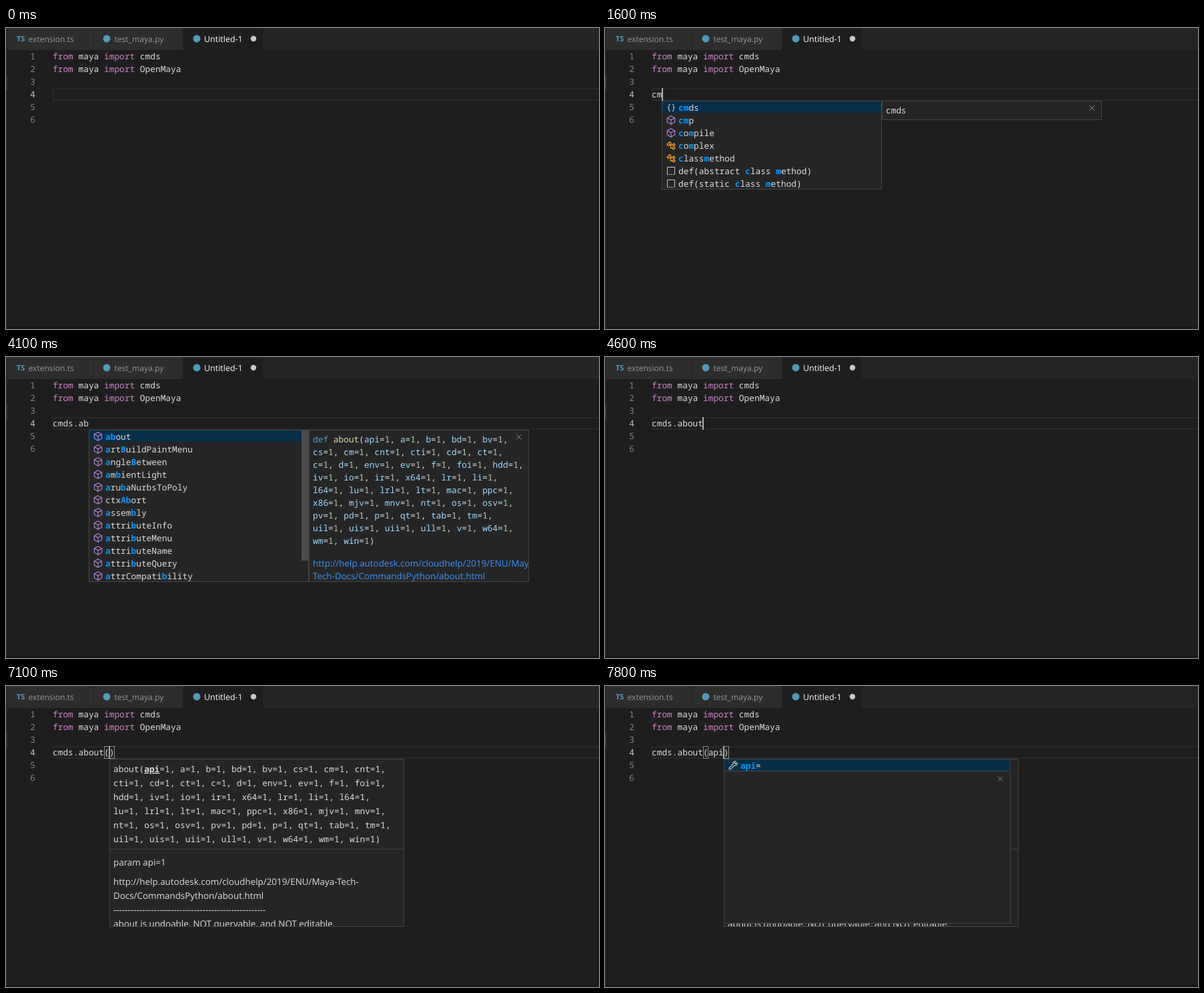
These frames come from a looping animation (889 by 451 pixels, 8 s). An HTML page:

```html
<!DOCTYPE html>
<html lang="en">
<head>
<meta charset="utf-8">
<title>Code completion</title>
<style>
html, body { margin: 0; width: 100%; height: 100%; overflow: hidden; background: #1e1e1e; }
svg { display: block; width: 100%; height: 100%; }
text { white-space: pre; text-rendering: geometricPrecision; }
.mono { font: 12.83px "Noto Sans Mono", "DejaVu Sans Mono", monospace; }
.ui { font: 13.4px "Open Sans", "Noto Sans", sans-serif; }
.tab { font: 12.1px "Open Sans", "Noto Sans", sans-serif; }
</style>
</head>
<body>
<svg id="stage" viewBox="0 0 889 451" xmlns="http://www.w3.org/2000/svg"></svg>
<script>
const LOOP = 8000, CHAR = 7.698, TEXT_X = 70, TOP = 109, ROW = 19;
const FG = '#dedede', PINK = '#d183cc', MATCH = '#0097fb', PANEL = '#252526', EDGE = '#454545', PICK = '#062f4a';

const rect = (x, y, w, h, fill, more = '') =>
  `<rect x="${x}" y="${y}" width="${w}" height="${h}" fill="${fill}" ${more}/>`;
const frame = (x, y, w, h, fill, stroke) =>
  rect(x + .5, y + .5, w - 1, h - 1, fill, `stroke="${stroke}"`);
const path = (d, stroke, more = '') => `<path d="${d}" fill="none" stroke="${stroke}" ${more}/>`;
const text = (x, y, body, cls = 'mono', fill = FG, more = '') =>
  `<text x="${x}" y="${y}" class="${cls}" fill="${fill}" ${more}>${body}</text>`;
const span = (body, fill, more = '') => `<tspan fill="${fill}" ${more}>${body}</tspan>`;
const close = (x, y) => path(`M${x - 3.5} ${y - 3.5}l7 7m0 -7l-7 7`, '#8c8c8c');

const flags = ('api a b bd bv cs cm cnt cti cd ct c d env ev f foi hdd iv io ir x64 lr li l64 lu lrl lt ' +
  'mac ppc x86 mjv mnv nt os osv pv pd p qt tab tm uil uis uii ull v w64 wm win').split(' ');
const signature = `about(${flags.map(f => f + '=1').join(', ')})`;
const site = 'http://help.autodesk.com/cloudhelp/2019/ENU/';

function wrap(str, limit) {
  const lines = [''];
  for (const word of str.split(' ')) {
    const last = lines[lines.length - 1];
    if (last && last.length + 1 + word.length > limit) lines.push(word);
    else lines[lines.length - 1] = last ? last + ' ' + word : word;
  }
  return lines;
}

const paint = line => line
  .replace(/(\w+)=1/g, (_, name) => span(name, '#9cdcfe') + '=' + span('1', '#b5cea8'))
  .replace(/^def about/, span('def', '#569cd6') + ' ' + span('about', '#dcdcaa'));

const docLines = wrap('def ' + signature, 41).map(paint);
const tipLines = wrap(signature, 55);
tipLines[0] = tipLines[0].replace('api', span('api', FG, 'font-weight="700" text-decoration="underline"'));

const icons = {
  n: text(-7, 4, '{', 'mono', '#c5c5c5') + text(0, 4, '}', 'mono', '#c5c5c5'),
  m: path('M0-6.2L5.6-3.2V3L0 6.2L-5.6 3V-3.2ZM-5.6-3.2L0-.2L5.6-3.2M0-.2V6', '#b180d7', 'stroke-width="1.2"'),
  c: path('M-6-1.5L-2-5.5L0-3.5L-4 .5ZM-2.5-1H2M-.5-1V4H2M2-1L4.2-3L6-1L4 1ZM2 4L4.2 2L6 4L4 6Z', '#ee9d28', 'stroke-width="1.3"'),
  s: path('M-5.5 5V-5.5H5.5V5', '#c5c5c5') + path('M-6 5.5H6', '#c5c5c5', 'stroke-dasharray="2 1"'),
  w: path('M-6 4L0-2C-1-5 2-7 4-6L2-3.5L3.5-2L6-4C7-1 4 1.5 2 0L-4 6Q-6 6-6 4Z', '#c5c5c5', 'stroke-width="1.1"')
};

// Each entry is an icon key plus a label; * marks a matched letter.
const entries = str => str.split('|').map(e => [e[0], e.slice(1)]);
const lists = {
  c: entries('n*cmds|m*callable|m*chr|m*cmp|m*coerce|m*compile|c*complex|m*copyright|m*credits|c*classmethod|s*class|s*continue'),
  cm: entries('n*c*mds|m*c*mp|m*c*o*mpile'.replace('*c*o*m', '*co*m') +
    '|c*co*mplex|c*class*method|sdef(abstract *class *method)|sdef(static *class *method)'),
  cmds: entries('n*c*m*d*s'),
  ab: entries('m*a*bout|m*art*BuildPaintMenu|m*angle*Between|m*am*bientLight|m*aru*baNurbsToPoly|mctx*A*bort|' +
    'm*assem*bly|m*attri*buteInfo|m*attri*buteMenu|m*attri*buteName|m*attri*buteQuery|m*attrCompati*bility'),
  abo: entries('m*a*b*out|mctx*A*b*ort|m*aru*baNurbsT*oPoly|m*attri*buteInf*o'),
  api: entries('w*a*p*i=')
};

function menu(x, list, width = 330) {
  const h = list.length * ROW;
  return frame(x, TOP, width, h, PANEL, EDGE) + rect(x + 1, TOP + 1, width - 2, ROW - 2, PICK) +
    list.map(([icon, label], i) =>
      `<g transform="translate(${x + 14} ${TOP + 10 + i * ROW})">${icons[icon]}</g>` +
      text(x + 25, TOP + 15 + i * ROW, label.replace(/\*(.)/g, span('$1', MATCH, 'font-weight="700"')))
    ).join('') + (list.length === 12 ? rect(x + 319, TOP + 1, 10, 195, '#4b4b4b') : '');
}

function moduleDoc(x) {
  return frame(x + 330, TOP, 330, 29, PANEL, EDGE) + text(x + 336, 128, 'cmds') + close(x + 645, 120);
}

function commandDoc(x, bar) {
  const link = '#3794ff';
  return frame(x + 330, TOP, 330, 228, PANEL, EDGE) +
    `<svg x="${x + 331}" y="${TOP}" width="328" height="227" viewBox="${x + 331} ${TOP} 328 227">` +
    docLines.map((line, i) => text(x + 336, 128 + i * ROW, line)).join('') +
    text(x + 336, 314, site + 'Maya-', 'ui', link) +
    text(x + 336, 333, 'Tech-Docs/CommandsPython/about.html', 'ui', link) +
    rect(x + 331, 326, 305, 10, '#797979', `opacity="${bar}"`) + '</svg>' + close(x + 645, 120);
}

function tip(x) {
  const ui = (y, body) => text(x + 6, y, body, 'ui');
  return frame(x, TOP, 442, 252, PANEL, EDGE) +
    `<svg x="${x}" y="${TOP}" width="441" height="251" viewBox="${x} ${TOP} 441 251">` +
    tipLines.map((line, i) => text(x + 6, 129 + i * 21, line)).join('') +
    rect(x, 244, 442, 1, EDGE) + ui(269, 'param api=1') + ui(298, site + 'Maya-Tech-') +
    ui(319, 'Docs/CommandsPython/about.html') + ui(340, '-'.repeat(53)) +
    ui(361, 'about is undoable, NOT queryable, and NOT editable.') + '</svg>';
}

const withModule = key => x => menu(x, lists[key]) + moduleDoc(x);
const withCommand = (key, bar) => x => menu(x, lists[key]) + commandDoc(x, bar);
const argument = x => tip(x) + frame(x, TOP + 18, 430, 229, PANEL, EDGE) +
  menu(x, lists.api, 430) + close(x + 414.5, 139);
const none = () => '';

// time, typed text, caret shown, popup
const steps = [
  [0, '', 0, none], [500, '', 1, none], [1000, '', 0, none],
  [1300, 'c', 1, none], [1400, 'c', 1, x => menu(x, lists.c)], [1500, 'c', 1, withModule('c')],
  [1600, 'cm', 1, withModule('cm')], [1700, 'cmds', 1, withModule('cmds')],
  [1800, 'cmds.', 1, withModule('cmds')], [2300, 'cmds.a', 1, withModule('cmds')],
  [2500, 'cmds.ab', 1, withModule('cmds')], [2900, 'cmds.ab', 0, withModule('cmds')],
  [3000, 'cmds.ab', 0, x => menu(x, lists.ab)], [3100, 'cmds.ab', 0, withCommand('ab', .12)],
  [3400, 'cmds.ab', 1, withCommand('ab', .12)], [3600, 'cmds.ab', 1, withCommand('ab', .08)],
  [3800, 'cmds.ab', 0, withCommand('ab', .05)], [4100, 'cmds.ab', 0, withCommand('ab', .02)],
  [4300, 'cmds.abo', 1, withCommand('abo', .02)],
  [4600, 'cmds.about', 1, none], [4900, 'cmds.about', 0, none],
  [5300, 'cmds.about(', 1, none], [5700, 'cmds.about(', 0, none],
  [6200, 'cmds.about(', 1, tip], [6700, 'cmds.about(', 0, tip], [7100, 'cmds.about(', 1, tip],
  [7200, 'cmds.about(a', 1, tip], [7400, 'cmds.about(ap', 1, tip],
  [7500, 'cmds.about(api', 1, tip], [7800, 'cmds.about(api', 1, argument]
];

const importLine = (row, name) => text(TEXT_X, 47 + row * ROW,
  span('from', PINK) + ' maya ' + span('import', PINK) + ' ' + name);

const backdrop = rect(0, 0, 889, 451, '#1e1e1e') + rect(0, 0, 889, 33, PANEL) + rect(0, 0, 2, 451, PANEL) +
  rect(0, 71, 2, 22, '#37373d') + rect(0, 448, 889, 3, '#1a1518') +
  rect(2, 0, 128, 33, '#2d2d2d') + rect(131, 0, 134, 33, '#2d2d2d') + rect(266, 0, 119, 33, '#1e1e1e') +
  text(16, 20, 'TS', 'tab', '#519aba', 'style="font-size:11px;font-weight:700"') +
  text(33.5, 21, 'extension.ts', 'tab', '#969696') +
  text(162.5, 21, 'test_maya.py', 'tab', '#969696') +
  text(297, 21, 'Untitled-1', 'tab', '#ffffff', 'style="font-size:12.5px"') +
  [151, 286].map(x => `<circle cx="${x}" cy="16" r="5.5" fill="#519aba"/>`).join('') +
  '<circle cx="371" cy="16" r="4.2" fill="#c8c8c8"/>' +
  [1, 2, 3, 4, 5, 6].map(n => text(44, 28 + n * ROW, n, 'mono', n === 4 ? '#c6c6c6' : '#858585',
    `text-anchor="end" ${n === 4 ? 'font-weight="700"' : ''}`)).join('') +
  importLine(0, 'cmds') + importLine(1, 'OpenMaya') +
  rect(71, 91, 830, 17, 'none', 'stroke="#282828" stroke-width="2"');

const columnX = n => TEXT_X + n * CHAR;
const bracket = n => frame(Math.round(columnX(n)), 90, 8, 19, '#1c241c', '#888888');

const stage = document.getElementById('stage');
let shown;

function draw(t) {
  const step = steps.findLast(s => s[0] <= t);
  if (step === shown) return;
  shown = step;
  const [, typed, caret, popup] = step;
  const n = typed.length, open = typed.indexOf('('), x = columnX(n);
  stage.innerHTML = backdrop + (open < 0 ? '' : bracket(open) + bracket(n)) +
    text(TEXT_X, 104, typed + (open < 0 ? '' : ')')) +
    popup(Math.round(x)) + (caret ? rect(Math.floor(x), 90, 2, 19, '#aeafad') : '');
}

function tick(now) {
  draw(now % LOOP);
  requestAnimationFrame(tick);
}
draw(0);
requestAnimationFrame(tick);
</script>
</body>
</html>
```
